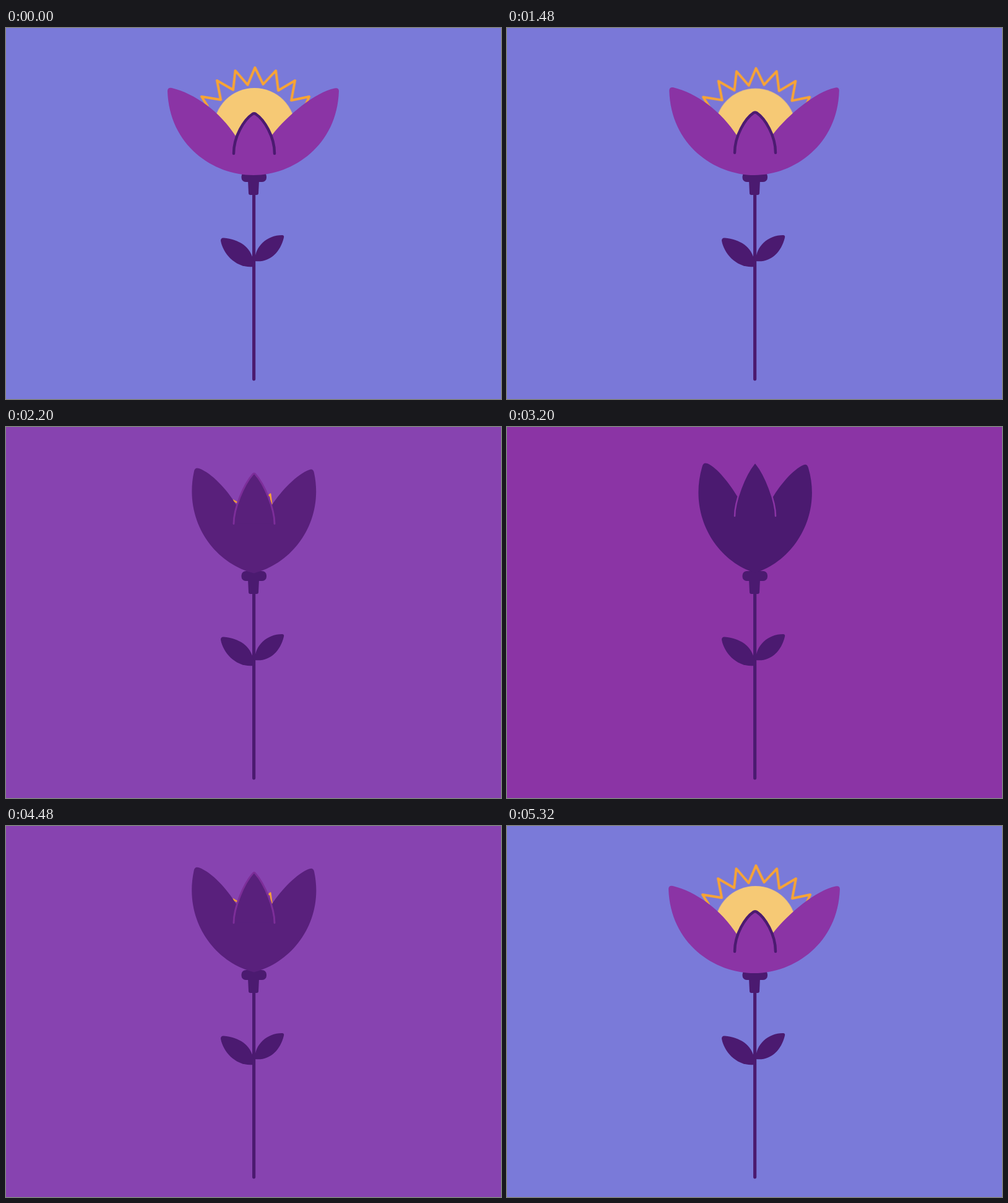
Write an HTML page that moves like this. It is 800 by 600 pixels and loops after 5.36 s.

```html
<!DOCTYPE html>
<html lang="en">
<head>
<meta charset="utf-8">
<title>Night flower</title>
<style>
  :root {
    --violet: #8b34a5;
    --plum: #4b1a70;
    --sky: #7a7ad9;
    --cycle: 5360ms cubic-bezier(.58, 0, .42, 1) infinite;
  }
  html, body { margin: 0; width: 100%; height: 100%; overflow: hidden; }
  body { background: var(--sky); animation: dusk var(--cycle); }
  svg { display: block; width: 100%; height: 100%; }

  .plant { animation: boil 640ms step-end infinite; }
  .stem { fill: var(--plum); }
  .sun { animation: set var(--cycle); }
  .disc { fill: #f6c975; }
  .rays { fill: none; stroke: #f9a433; stroke-width: 4; stroke-linejoin: round; stroke-linecap: round; }
  .petals, .front { animation: fold var(--cycle); }
  .front { stroke-linecap: round; stroke-linejoin: round; }

  .petals {
    --open: path("M400 238 C335 238 264 190 261 102 Q261 96 268 97 C305 106 346 135 372 176 L400 190 L430 173 C456 140 500 104 531 97.5 Q538 96 538 102 C535 190 464 238 400 238 Z");
    --shut: path("M401 236 C335 215 293 140 315.5 64 Q317 56.5 324 59 C340 66 360 92 372 112 L400 130 L430 113 C442 93 462 69 479 61.5 Q485 59 487 66 C509 140 467 215 401 236 Z");
    --w0: 0px;
    --w1: 0px;
  }
  .front {
    --open: path("M368 203 C368 175 385 148 398.5 139 Q401 137.5 403.5 139 C417 148 434 175 434 203");
    --shut: path("M368 144 C368 120 384 78 399.5 59 Q401 57 402.5 59 C418 78 434 120 434 144");
    --w0: 4.5px;
    --w1: 2.5px;
  }

  /* open until 1280 ms, shut from 2720 to 3980 ms */
  @keyframes dusk {
    0%, 23.881%, 100% { background-color: var(--sky); }
    50.746%, 74.254% { background-color: var(--violet); }
  }
  @keyframes fold {
    0%, 23.881%, 100% { d: var(--open); fill: var(--violet); stroke: var(--plum); stroke-width: var(--w0); }
    50.746%, 74.254% { d: var(--shut); fill: var(--plum); stroke: var(--violet); stroke-width: var(--w1); }
  }
  @keyframes set {
    0%, 23.881%, 100% { transform: translate(401.5px, 163px) scale(1); }
    50.746%, 74.254% { transform: translate(406.5px, 169px) scale(.53); }
  }
  /* hand-drawn edge, redrawn every 160 ms */
  @keyframes boil {
    0% { filter: url(#rough1); }
    25% { filter: url(#rough2); }
    50% { filter: url(#rough3); }
    75%, 100% { filter: url(#rough4); }
  }
</style>
</head>
<body>
<svg viewBox="0 0 800 600" color-interpolation-filters="sRGB">
  <defs>
    <filter id="rough1" filterUnits="userSpaceOnUse" x="0" y="0" width="800" height="600">
      <feTurbulence type="fractalNoise" baseFrequency=".06" seed="3"/>
      <feDisplacementMap in="SourceGraphic" scale="1.5" xChannelSelector="R" yChannelSelector="G"/>
    </filter>
    <filter id="rough2" filterUnits="userSpaceOnUse" x="0" y="0" width="800" height="600">
      <feTurbulence type="fractalNoise" baseFrequency=".06" seed="11"/>
      <feDisplacementMap in="SourceGraphic" scale="1.5" xChannelSelector="R" yChannelSelector="G"/>
    </filter>
    <filter id="rough3" filterUnits="userSpaceOnUse" x="0" y="0" width="800" height="600">
      <feTurbulence type="fractalNoise" baseFrequency=".06" seed="24"/>
      <feDisplacementMap in="SourceGraphic" scale="1.5" xChannelSelector="R" yChannelSelector="G"/>
    </filter>
    <filter id="rough4" filterUnits="userSpaceOnUse" x="0" y="0" width="800" height="600">
      <feTurbulence type="fractalNoise" baseFrequency=".06" seed="37"/>
      <feDisplacementMap in="SourceGraphic" scale="1.5" xChannelSelector="R" yChannelSelector="G"/>
    </filter>
  </defs>
  <g class="plant">
    <g class="sun">
      <path class="rays" d="M-76 -37 L-85.5 -52 L-54.5 -47 L-60.5 -78 L-34.5 -63 L-31 -94 L-11 -71 L.8 -99 L14 -72 L34.5 -94 L38.5 -62 L65.5 -78 L59.5 -46 L88.5 -52 L82 -37"/>
      <circle class="disc" r="66"/>
    </g>
    <g class="stem">
      <rect x="398" y="262" width="5.2" height="308.5" rx="2.4"/>
      <rect x="380.5" y="233" width="40.5" height="16" rx="7"/>
      <path d="M391 246 H409 L408 267 Q408 270 405 270 H395 Q392 270 392 267 Z"/>
      <path d="M400 386 C372 389 351 366 347 344 Q347 339 352 339.5 C376 342 396 353 400 378 Z"/>
      <path d="M402 377 C402 353 422 335 446 335 Q450 335 449 339 C443 364 425 380 402 377 Z"/>
    </g>
    <path class="petals"/>
    <path class="front"/>
  </g>
</svg>
</body>
</html>
```
